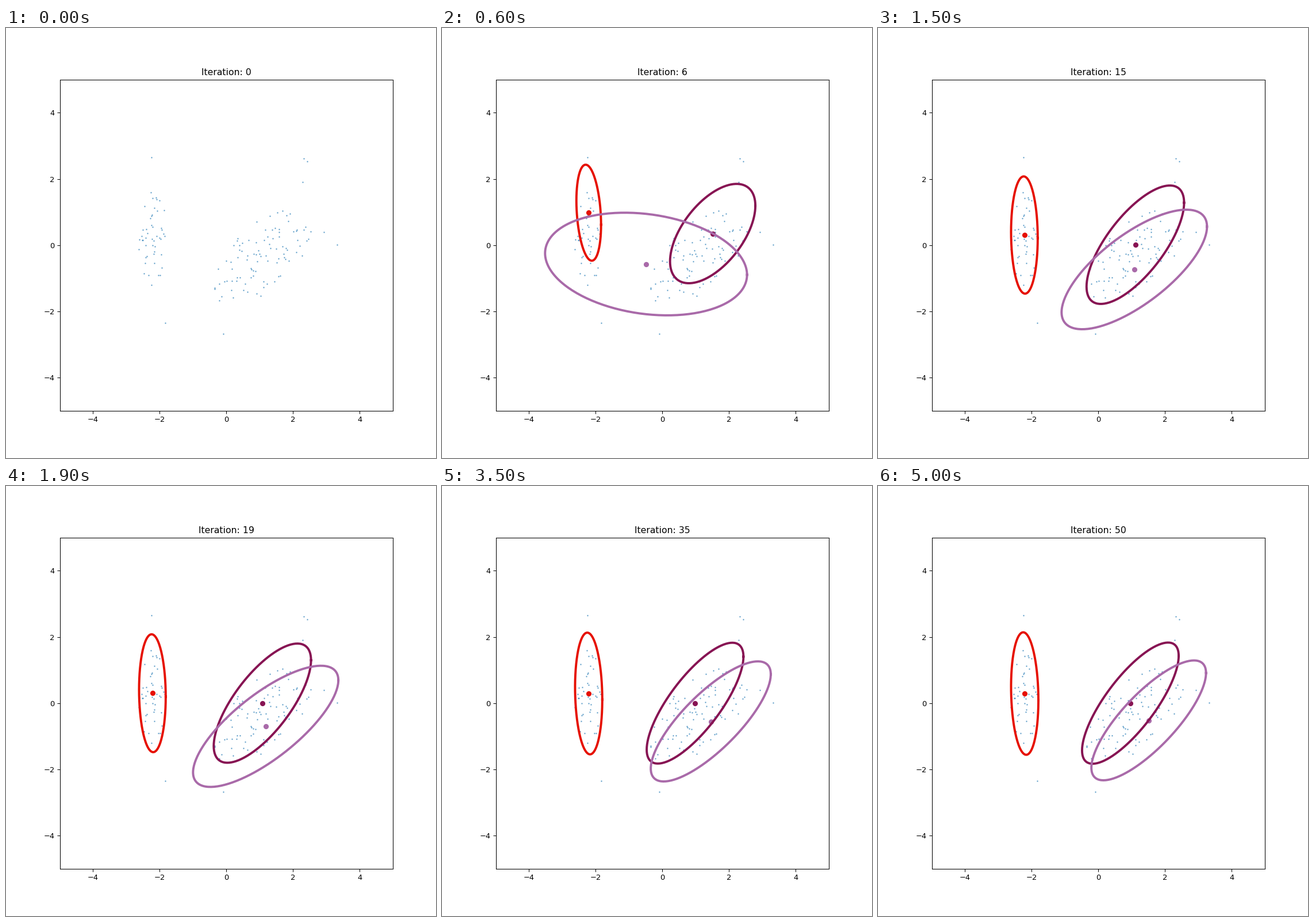
Animation, 748 px wide and 748 px high, one loop 5100 ms. Source, as a matplotlib script:

```python
import numpy as np
import matplotlib.pyplot as plt
from matplotlib.animation import FuncAnimation

FRAMES, INTERVAL = 51, 100
KEYS = [6, 11, 19, 50]

# Pose at each key iteration: mean x, mean y, half width, half height, correlation
CLUSTERS = {
    "#e61000": [(-2.21, 0.98, 0.37, 1.45, -0.25), (-2.22, 0.33, 0.40, 1.73, -0.01),
                (-2.22, 0.30, 0.40, 1.78, -0.06), (-2.21, 0.29, 0.41, 1.85, -0.11)],
    "#871453": [(1.51, 0.35, 1.28, 1.50, 0.56), (1.23, 0.07, 1.48, 1.74, 0.66),
                (1.08, 0.00, 1.46, 1.80, 0.72), (0.96, 0.00, 1.45, 1.83, 0.78)],
    "#a96aa9": [(-0.49, -0.57, 3.03, 1.55, -0.21), (0.64, -0.88, 2.19, 1.70, 0.53),
                (1.18, -0.70, 2.18, 1.83, 0.76), (1.51, -0.52, 1.72, 1.81, 0.79)],
}
OUTLIERS = [(-2.24, 2.66), (-1.84, -2.35), (-0.09, -2.67), (2.32, 2.62),
            (2.43, 2.53), (2.28, 1.91), (3.32, 0.01), (2.92, 0.40)]


def ellipse(pose, t, radius=1):
    cx, cy, a, b, corr = pose
    return (cx + radius * a * np.cos(t),
            cy + radius * b * np.sin(t + np.arcsin(corr)))


def cloud(rng, pose, n):
    """Points scattered over an ellipse, a little denser in the middle."""
    radius = ((np.arange(n) + 0.5) / n) ** 0.6
    return np.column_stack(ellipse(pose, rng.uniform(0, 2 * np.pi, n), radius))


def pose_at(poses, frame):
    """Early shapes are wider; later ones glide between the key poses."""
    if frame <= KEYS[0]:
        return poses[0] * [1, 1, 1 + 0.03 * (KEYS[0] - frame), 1, 1]
    i = np.searchsorted(KEYS, frame) - 1
    u = (frame - KEYS[i]) / (KEYS[i + 1] - KEYS[i])
    if i > 0:
        u = 1 - (1 - u) ** 2.4
    return poses[i] + u * (poses[i + 1] - poses[i])


fig, ax = plt.subplots(figsize=(8, 8), dpi=93.5)
ax.set(xlim=(-5, 5), ylim=(-5, 5),
       xticks=range(-4, 5, 2), yticks=range(-4, 5, 2))
title = ax.set_title("Iteration: 0")

rng = np.random.default_rng(7)
points = np.vstack([OUTLIERS,
                    cloud(rng, (-2.22, 0.25, 0.42, 1.5, 0), 48),
                    cloud(rng, (1.1, -0.3, 1.5, 1.5, 0.6), 94)])
ax.scatter(*points.T, s=1, color="C0", alpha=0.5)

parts = []
for color, poses in CLUSTERS.items():
    dot = ax.scatter([0], [0], color=color)
    line, = ax.plot([], [], color=color, lw=3)
    parts.append((np.array(poses), dot, line))
turn = np.linspace(0, 2 * np.pi, 201)


def update(frame):
    title.set_text(f"Iteration: {frame}")
    for poses, dot, line in parts:
        pose = pose_at(poses, frame)
        dot.set_offsets([pose[:2]])
        line.set_data(*ellipse(pose, turn))
        for artist in (dot, line):
            artist.set_visible(frame > 0)
    return []


anim = FuncAnimation(fig, update, frames=FRAMES, interval=INTERVAL,
                     init_func=lambda: update(0), repeat=True, repeat_delay=0)
plt.show()
```
